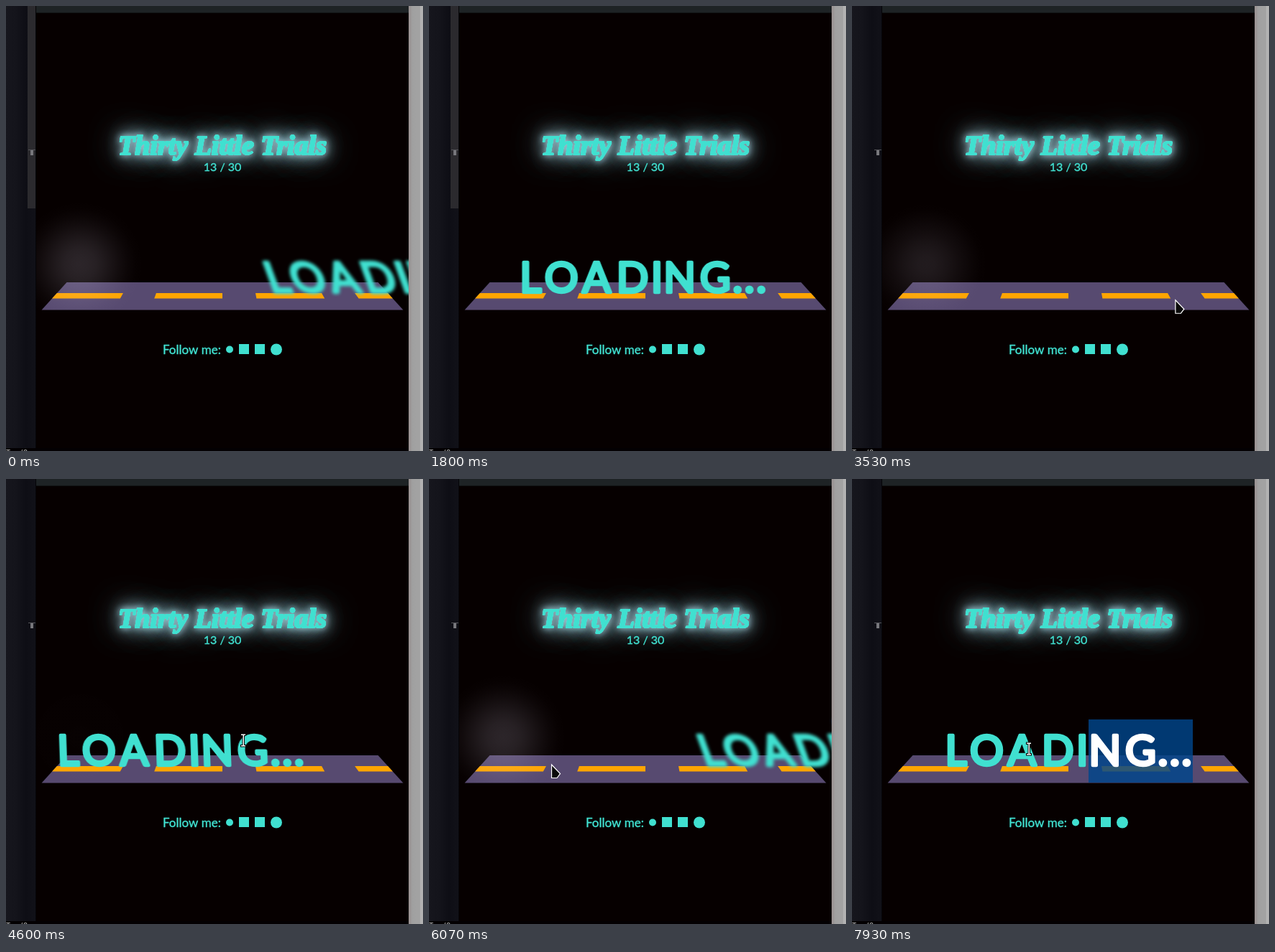
These frames come from a looping animation (580 px wide and 620 px high, 8 s). An HTML page with a canvas:

```html
<!DOCTYPE html>
<html lang="en">
<head>
<meta charset="utf-8">
<title>Loading road</title>
<style>
  html, body { margin: 0; width: 100%; height: 100%; overflow: hidden; background: #060000; }
  canvas { display: block; }
</style>
</head>
<body>
<canvas id="stage" width="580" height="620"></canvas>
<script>
const W = 580, H = 620;
const LOOP = 8000, CYCLE = 3000, CYCLE_START = 75;
const TEAL = '#40e0d0';
const PAGE = { left: 42, right: 560, top: 10 };
const WORD_MID = { x: 303, y: 379 };
const SELECT = { x: 329, y: 335, w: 145, h: 88 };
const DRAG_START = 4600, DRAG_END = 5100;

const stage = document.getElementById('stage').getContext('2d');
const scene = layer(), word = layer();

function layer() {
  const c = document.createElement('canvas');
  c.width = W;
  c.height = H;
  return c.getContext('2d');
}

const clamp = (v, lo, hi) => Math.min(hi, Math.max(lo, v));
const mix = (a, b, u) => a + (b - a) * u;

// Eased step from 0 at a to 1 at b
function ramp(t, a, b) {
  const u = clamp((t - a) / (b - a), 0, 1);
  return u * u * (3 - 2 * u);
}

// One drive-through: p runs from 0 to 1. The word brakes, rests and speeds off.
function driveAt(t) {
  const p = (t - CYCLE_START + CYCLE) % CYCLE / CYCLE;
  const arriving = p < 0.6;
  const loose = arriving ? 1 - ramp(p, 0.38, 0.54) : ramp(p, 0.82, 0.86);
  return {
    shift: arriving ? -1020 * (1 - ramp(p, 0, 0.595)) : 247 * ramp(p, 0.835, 1),
    lean: Math.tan(20 * loose * Math.PI / 180),
    blur: 2.1 * loose * loose,
    light: arriving ? Math.max(0, 1 - p / 0.53) : ramp(p, 0.78, 0.97),
  };
}

// Pointer stops: time, x, y
const stops = [[2200, 8, 90], [2670, 282.5, 374], [4000, 516, 424], [4600, 330, 364],
  [5100, 518, 385], [6070, 170, 398], [7400, 228, 215], [7900, 246, 376]];

function pointerAt(t) {
  let [, x, y] = stops[0];
  stops.slice(1).forEach(([end, nx, ny], i) => {
    const u = ramp(t, stops[i][0], end);
    x = mix(x, nx, u);
    y = mix(y, ny, u);
  });
  return { x, y };
}

function poly(c, points, fill) {
  c.beginPath();
  points.forEach(([x, y]) => c.lineTo(x, y));
  c.closePath();
  c.fillStyle = fill;
  c.fill();
}

function box(c, x, y, w, h, fill) {
  c.fillStyle = fill;
  c.fillRect(x, y, w, h);
}

function dot(c, x, y, r) {
  c.beginPath();
  c.arc(x, y, r, 0, 7);
  c.fill();
}

function across(c, x0, x1, colors) {
  const g = c.createLinearGradient(x0, 0, x1, 0);
  colors.forEach((color, i) => g.addColorStop(i / (colors.length - 1), color));
  return g;
}

// Filled text thickened by a round outline
function boldText(c, text, x, y, weight) {
  c.lineWidth = weight;
  c.lineJoin = 'round';
  c.fillText(text, x, y);
  c.strokeText(text, x, y);
}

function drawTitle(c) {
  const title = () => boldText(c, 'Thirty Little Trials', 301, 207, 1.8);
  c.save();
  c.font = 'italic bold 38px "Liberation Serif", serif';
  c.textAlign = 'center';
  c.fillStyle = c.strokeStyle = TEAL;
  c.shadowColor = 'rgba(180, 232, 245, 0.75)';
  for (const blur of [44, 22, 10]) {
    c.shadowBlur = blur;
    title();
  }
  c.shadowColor = 'transparent';
  title();
  c.restore();
}

function drawLabels(c) {
  c.fillStyle = c.strokeStyle = TEAL;
  c.textAlign = 'center';
  c.font = '16px Lato, sans-serif';
  boldText(c, '13 / 30', 301, 230, 0.4);
  c.textAlign = 'left';
  c.font = '17px Lato, sans-serif';
  boldText(c, 'Follow me:', 218, 484.5, 0.4);
  dot(c, 311, 478.5, 5);
  c.fillRect(324, 471, 14, 14);
  c.fillRect(346, 471, 14, 14);
  dot(c, 376, 478.5, 8);
}

// Road coordinates: u runs from -1 (left edge) to 1 (right edge).
function drawRoad(c) {
  const at = (u, y) => [301 + u * (216.5 + (y - 385) * 0.91), y];
  const strip = (u0, u1, y0, y1, fill) =>
    poly(c, [at(u0, y0), at(u1, y0), at(u1, y1), at(u0, y1)], fill);
  strip(-1, 1, 385, 423.4, '#574a70');
  for (let u = -1; u < 1; u += 0.6)
    strip(u, Math.min(1, u + 0.4), 400, 407.5, '#ffa500');
}

function drawFrame(c) {
  box(c, 0, 0, 41, H, across(c, 0, 41, ['#16161d', '#14141b', '#0e0e15', '#111118']));
  box(c, 41, 0, 1, H, '#050508');
  box(c, 42, 0, 518, 9, '#1e2325');
  box(c, 42, 9, 518, 1, '#101213');
  box(c, 560, 0, 20, H, across(c, 560, 576, ['#988f8f', '#a0a0a0', '#a2a2a2', '#a2a2a2']));
  box(c, 576, 0, 4, H, '#b2b2b2');
  box(c, 0, 616, 560, 4, '#030002');
  c.font = '10px "DejaVu Sans Mono", monospace';
  c.fillStyle = '#b5b5b5';
  c.textAlign = 'left';
  c.fillText('T  /8', 0, 626);
}

function drawScene() {
  box(scene, 0, 0, W, H, '#060000');
  drawTitle(scene);
  drawLabels(scene);
  drawRoad(scene);
  drawFrame(scene);
}

const letterMids = [147, 187.5, 236.5, 287.5, 320.5, 352, 401, 432.5, 449, 465.5];

function drawLetters(color) {
  word.font = '58.5px Lato, sans-serif';
  word.fillStyle = word.strokeStyle = color;
  [...'LOADING...'].forEach((glyph, i) => {
    const m = word.measureText(glyph);
    const inkMid = (m.actualBoundingBoxRight - m.actualBoundingBoxLeft) / 2;
    boldText(word, glyph, letterMids[i] - inkMid, 399, 4.4);
  });
}

function drawWord(selected) {
  word.clearRect(0, 0, W, H);
  drawLetters(TEAL);
  if (selected <= 0) return;
  word.save();
  word.beginPath();
  word.rect(SELECT.x, SELECT.y, selected, SELECT.h);
  word.clip();
  word.clearRect(0, 0, W, H);
  box(word, 0, 0, W, H, 'rgba(0, 70, 140, 0.82)');
  drawLetters('#fff');
  word.restore();
}

function drawLight(strength) {
  const g = stage.createRadialGradient(103, 360, 0, 103, 360, 88);
  for (let u = 0; u <= 1; u += 0.125)
    g.addColorStop(u, `rgba(230, 220, 245, ${0.17 * strength * (1 - ramp(u, 0, 1))})`);
  box(stage, 42, 270, 160, 153, g);
}

function drawSidebar(t) {
  stage.globalAlpha = 1 - ramp(t, 2200, 2850);
  box(stage, 30, 0, 11, 282, '#2b2a2e');
  stage.globalAlpha = 1;
  box(stage, 31, 200, 10, 1, '#55555a');
  box(stage, 34, 201, 4, 7, '#77777c');
}

function drawTextPointer() {
  for (const [color, edge] of [['#000', 1], ['#fff', 0]]) {
    const bar = (x, y, w, h) =>
      box(stage, x - edge, y - edge, w + 2 * edge, h + 2 * edge, color);
    bar(-0.5, -8, 1.5, 16);
    bar(-3, -8.5, 6, 1.5);
    bar(-3, 7, 6, 1.5);
  }
}

function drawArrow() {
  poly(stage, [[0.5, 0], [12.5, 12.5], [8, 18.5], [0.5, 18.5]], '#0a0a0a');
  stage.strokeStyle = '#fff';
  stage.lineWidth = 1.2;
  stage.stroke();
}

function drawPointer({ x, y }, shift) {
  const overText = Math.abs(y - WORD_MID.y) < 44 && Math.abs(x - shift - WORD_MID.x) < 172;
  stage.save();
  stage.translate(x, y);
  if (overText) drawTextPointer();
  else drawArrow();
  stage.restore();
}

function selectedWidth(t, x) {
  if (t < DRAG_START) return 0;
  return t < DRAG_END ? clamp(x - SELECT.x - 1, 0, SELECT.w) : SELECT.w;
}

function draw(t) {
  const { shift, lean, blur, light } = driveAt(t);
  const pointer = pointerAt(t);

  stage.drawImage(scene.canvas, 0, 0);
  drawSidebar(t);
  drawLight(light);
  drawWord(selectedWidth(t, pointer.x));

  stage.save();
  stage.beginPath();
  stage.rect(PAGE.left, PAGE.top, PAGE.right - PAGE.left, H);
  stage.clip();
  stage.transform(1, 0, lean, 1, shift - lean * WORD_MID.y, 0);
  if (blur > 0.05) stage.filter = `blur(${blur.toFixed(2)}px)`;
  stage.drawImage(word.canvas, 0, 0);
  stage.restore();

  if (t >= stops[0][0]) drawPointer(pointer, shift);
}

drawScene();
const begin = performance.now();
function tick() {
  draw((performance.now() - begin) % LOOP);
  requestAnimationFrame(tick);
}
tick();
</script>
</body>
</html>
```
